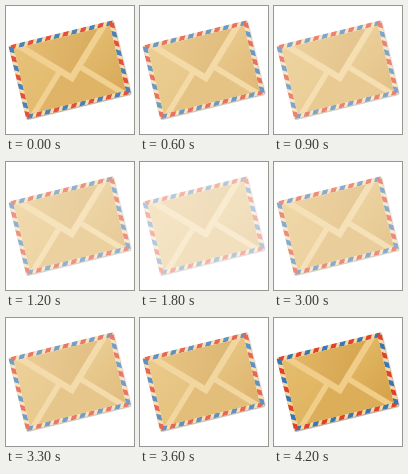
An HTML page that plays this animation: 128 by 128 pixels, repeating every 5100 ms.

```html
<!DOCTYPE html>
<html lang="en">
<head>
<meta charset="utf-8">
<title>Fading airmail envelope</title>
<style>
html, body { margin: 0; width: 100%; height: 100%; overflow: hidden; background: #fff; }
svg { display: block; width: 100vw; height: 100vh; }
</style>
</head>
<body>
<svg viewBox="0 0 128 128">
  <defs>
    <linearGradient id="paper" x1="0" y1="0" x2="1" y2="1">
      <stop offset="0" stop-color="#e6bd6e"/>
      <stop offset=".5" stop-color="#e0b561"/>
      <stop offset="1" stop-color="#d5a048"/>
    </linearGradient>
    <linearGradient id="flap" x1="0" y1="0" x2="1" y2=".3">
      <stop offset="0" stop-color="#e2b765"/>
      <stop offset="1" stop-color="#d5a450"/>
    </linearGradient>
    <filter id="blur" x="-10%" y="-10%" width="120%" height="120%">
      <feGaussianBlur stdDeviation=".7"/>
    </filter>
    <clipPath id="inner"><rect x="4.5" y="4.5" width="99" height="67"/></clipPath>
    <clipPath id="outer"><rect width="108" height="76" rx="1.6"/></clipPath>
  </defs>
  <g id="mail">
    <g transform="translate(2.3 39.6) rotate(-13.7)">
      <rect x=".3" y=".7" width="108" height="76" rx="1.6" fill="#4a3820" opacity=".5" filter="url(#blur)"/>
      <g clip-path="url(#outer)">
        <rect width="108" height="76" fill="#f3d9a4"/>
        <g id="border"></g>
      </g>
      <g clip-path="url(#inner)">
        <rect x="4.5" y="4.5" width="99" height="67" fill="url(#paper)"/>
        <path d="M5 72L44 33H64L103 72Z" fill="#dcae59"/>
        <path d="M4 77L48 33M104 77L60 33" stroke="#f0cd88" stroke-width="5.6" fill="none"/>
        <path d="M7 4L54 51L101 4Z" fill="#f0cd88"/>
        <path d="M16 4L54 42L92 4Z" fill="url(#flap)"/>
      </g>
    </g>
  </g>
</svg>
<script>
const W = 108, H = 76, BAND = 4.5;
const STEP = 300, DOWN = 8, UP = 7, LOOP = 5100, FADE = 0.7;
const mail = document.getElementById('mail');

// Slanted airmail dashes along one edge, red and blue in turn.
function dashes(length, pairs, transform) {
  const pitch = length / pairs / 2;
  const dash = pitch * 0.6;
  let out = `<g transform="${transform}">`;
  for (let i = 0; i < pairs * 2; i++) {
    const color = i % 2 ? '#3a76b4' : '#e2402a';
    out += `<path d="M${i * pitch + 3} 0h${dash}l-2.5 ${BAND}h${-dash}z" fill="${color}"/>`;
  }
  return out + '</g>';
}

document.getElementById('border').innerHTML =
  dashes(W, 6, '') +
  dashes(W, 6, `translate(${W} ${H}) rotate(180)`) +
  dashes(H, 4, `translate(${W} 0) rotate(90)`) +
  dashes(H, 4, `translate(0 ${H}) rotate(-90)`);

function opacityAt(ms) {
  const n = Math.min(Math.floor(ms % LOOP / STEP) + 1, DOWN + UP);
  const depth = n <= DOWN ? n / DOWN : (DOWN + UP - n) / UP;
  return 1 - FADE * depth;
}

const start = performance.now();
function draw(now) {
  mail.setAttribute('opacity', opacityAt(Math.max(0, now - start)).toFixed(3));
  requestAnimationFrame(draw);
}
draw(start);
</script>
</body>
</html>
```
